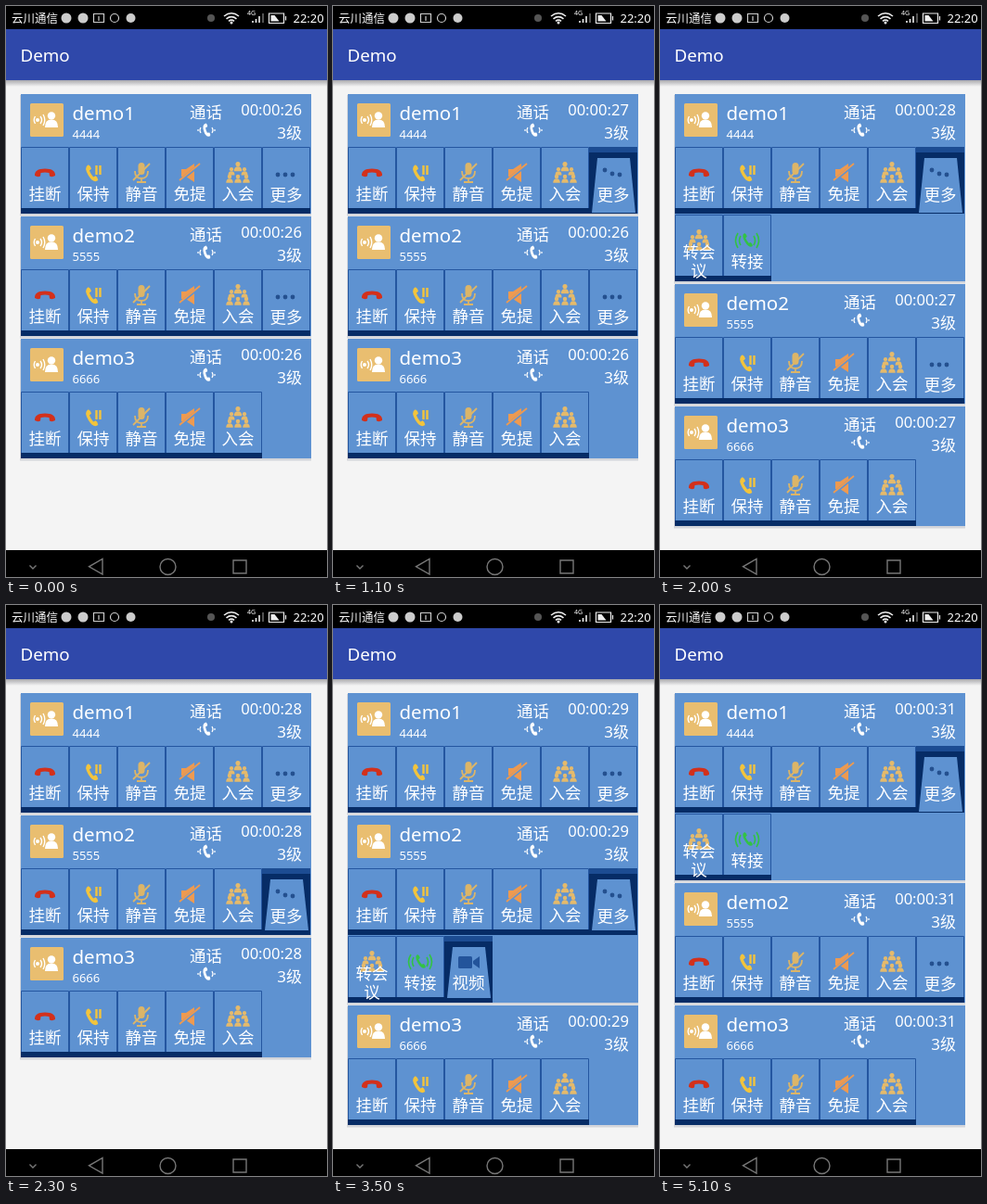
Animation, 346 px wide and 616 px high, one loop 5500 ms. Source, as an HTML page:

```html
<!DOCTYPE html>
<html lang="zh-CN">
<head>
<meta charset="utf-8">
<style>
  html, body { margin: 0; width: 100%; height: 100%; overflow: hidden; background: #f4f4f4; }
  svg { display: block; width: 346px; height: 616px; }
  text { font-family: "Noto Sans", "Noto Sans CJK SC", "Noto Sans CJK", sans-serif; fill: #fff; }
</style>
</head>
<body>
<svg id="stage" viewBox="0 0 346 616">
  <defs>
    <linearGradient id="shade" x2="0" y2="1">
      <stop stop-color="#a9a9ad"/><stop offset="1" stop-color="#f4f4f4"/>
    </linearGradient>
  </defs>
  <rect width="346" height="616" fill="#f4f4f4"/>
  <rect y="80" width="346" height="7" fill="url(#shade)"/>
  <rect y="25" width="346" height="55" fill="#2f48aa"/>
  <text x="15.500" y="60" font-size="18.800">Demo</text>

  <rect width="346" height="25"/>
  <text x="6" y="18" font-size="12.500">云川通信</text>
  <g fill="#ccc">
    <circle cx="65" cy="13" r="5.500"/><circle cx="83" cy="13" r="5.500"/><circle cx="134.500" cy="13" r="5"/>
  </g>
  <circle cx="221" cy="13" r="4" fill="#555"/>
  <g fill="none" stroke="#ccc" stroke-width="1.200">
    <path d="M94.500 8.500h11v9h-11zM100 11v5"/>
    <circle cx="117" cy="13" r="4.500"/>
  </g>
  <g fill="none" stroke="#eee" stroke-width="1.600">
    <path d="M235 11q8-6.500 16 0M237.500 13.800q5.500-4.500 11 0M240 16.300q3-2.500 6 0"/>
    <path d="M266 18v-2M269.500 18v-4M273 18v-7"/><path d="M277 18V8" stroke="#666"/>
    <path d="M283.500 8h16v10.500h-16zM301.500 11v4.500" stroke-width="1.200"/>
  </g>
  <circle cx="243" cy="18" r="1.500" fill="#eee"/>
  <path d="M285.500 10h4l5 6.500h-9z" fill="#eee"/>
  <text x="260" y="10" font-size="7">4G</text>
  <text x="309.500" y="18" font-size="13">22:20</text>

  <rect y="587" width="346" height="29"/>
  <g fill="none" stroke="#777" stroke-width="1.400">
    <path d="M25.500 603.500l3.500 3.500 3.500-3.500M104 596.500v16.500l-14.500-8.200zM245 598h14v14h-14z"/>
    <circle cx="174.500" cy="605" r="8.500"/>
  </g>
  <g id="cards"></g>
</svg>
<script>
const LOOP = 5500, BLUE = '#5e92d1', DARK = '#062c66', EDGE = '#2456a0', SAND = '#e5ba6b';

const at = (x, y, body, more = '') => `<g transform="translate(${x} ${y}) ${more}">${body}</g>`;
const box = (x, y, w, h, fill, more = '') =>
  `<rect x="${x}" y="${y}" width="${w}" height="${h}" fill="${fill}" ${more}/>`;
const path = (d, fill) => `<path d="${d}" fill="${fill}"/>`;
const line = (d, color, w = 1.5) => `<path d="${d}" fill="none" stroke="${color}" stroke-width="${w}"/>`;
const dot = (x, y, r, fill) => `<circle cx="${x}" cy="${y}" r="${r}" fill="${fill}"/>`;
const text = (x, y, size, s, anchor = 'start') =>
  `<text x="${x}" y="${y}" font-size="${size}" text-anchor="${anchor}">${s}</text>`;

const handset = color =>
  path('M-11 3Q-11.500-4.500 0-4.500T11 3Q8 5 5 3.500L4.500 0Q0-1-4.500 0L-5 3.500Q-8 5-11 3Z', color);
const person = (x, y, k, color) => at(x, y,
  dot(0, -4, 3, color) + path('M-5 5Q-5-1 0-1T5 5Z', color), `scale(${k})`);
const dots = tilted =>
  [-9, -1, 7].map((x, i) => dot(x, tilted ? [-3, 1, 2][i] : 2, 2.4, '#24508f')).join('');

const icons = {
  hangup: () => handset('#d3301b'),
  hold: () => at(-2, 1, handset('#f3c43c'), 'rotate(-122) scale(.9 .8)') +
    line('M3.500-8V2M7.500-8V2', '#f3c43c', 2.4),
  mute: () => box(-3.500, -11, 7, 13, '#dcb568', 'rx="3.500"') +
    line('M-7-2Q-7 6 0 6T7-2M0 6V10M-5 10H5M-9 8L9-10', '#dcb568', 1.8),
  speaker: () => path('M-9-4H-4L5-10V10L-4 4H-9Z', '#ee9a50') +
    line('M-11 9L11-9', BLUE, 3.5) + line('M-11 8L11-10', '#ee9a50', 1.8),
  group: () => person(0, -6, .85, SAND) + person(-7, -1, .7, SAND) + person(7, -1, .7, SAND) +
    [-9, 0, 9].map(x => person(x, 7, .75, SAND)).join(''),
  more: dots,
  transfer: () => at(0, 0, handset('#32c344'), 'rotate(-122) scale(.75 .6)') +
    line('M-10-8Q-15 0-10 8M-7-5Q-10 0-7 5M10-8Q15 0 10 8M7-5Q10 0 7 5', '#32c344', 1.6),
  video: () => box(-11, -6, 15, 13, '#23549b', 'rx="1.500"') + path('M5-1L12-6V7L5 2Z', '#23549b')
};

const mainRow = [['hangup', '挂断'], ['hold', '保持'], ['mute', '静音'],
  ['speaker', '免提'], ['group', '入会'], ['more', '更多']];
const extraRow = [['group', '转会议'], ['transfer', '转接'], ['video', '视频']];

// A pressed tile leans back, showing the dark base behind it.
function tile([icon, label], i, pressed, foot) {
  const low = icon === 'more' ? 1 : 0;
  const face = pressed
    ? box(0, 0, 52, 72, DARK) + box(0, 0, 52, 6, '#1c4c92') +
      path(`M9 12H44L50 ${foot}H3Z`, BLUE)
    : box(0, 0, 52, 66, BLUE) + line('M.5 66V.5H51.500V66', EDGE, 1) + box(0, 66, 52, 6, DARK);
  const name = label.length > 2
    ? text(26, 47, 17.5, label.slice(0, 2), 'middle') + text(26, 67, 17.5, label[2], 'middle')
    : text(26, 56.5 + low, 17.5, label, 'middle');
  return at(i * 52, 0, face + at(26, 28, icons[icon](pressed)) + name);
}

const avatar = box(10, 10, 36, 36, '#e9be70', 'rx="1.500"') +
  person(33, 29, 1.4, '#fff') + dot(18, 28, 2, '#fff') +
  line('M15.500 24Q13 28 15.500 32M21 24Q24 28 21 32M24 22Q27.500 28 24 34', '#fff', 1.4);
const ringing = at(200, 39, at(0, 0, handset('#fff'), 'rotate(-108) scale(.66)') +
  line('M-6-3Q-8 0-6 3M6-3Q8 0 6 3M-9-1V1M9-1V1', '#fff', 1.2));

const within = (t, spans) => spans.some(([a, b]) => t >= a && t < b);
const cards = [
  { name: 'demo1', number: '4444', row: mainRow, extra: extraRow.slice(0, 2), foot: 71,
    press: [[1100, 2200], [4000, LOOP]], open: [[1200, 2200], [4000, LOOP]],
    ticks: [1100, 2000, 3100, 4000, 5000] },
  { name: 'demo2', number: '5555', row: mainRow, extra: extraRow, foot: 67,
    press: [[2200, 3700]], open: [[2400, 3700]],
    ticks: [1200, 2100, 3200, 4100, 5000] },
  { name: 'demo3', number: '6666', row: mainRow.slice(0, 5), press: [], open: [],
    ticks: [1400, 2200, 3200, 4100, 5100] }
];

function card(c, y, t) {
  const open = within(t, c.open), pressed = within(t, c.press), h = open ? 202 : 129;
  const secs = 26 + c.ticks.filter(k => t >= k).length;
  const row = c.row.map((d, i) => tile(d, i, pressed && i === 5, c.foot)).join('');
  const extra = open ? c.extra.map((d, i) =>
    tile(d, i, d[0] === 'video' && within(t, [[3100, 3600]]), 67)).join('') : '';
  return at(16, y,
    box(-1, 1, 314, h + 1.5, '#d3d5da') + box(0, 0, 313, h, BLUE) +
    avatar + text(55.5, 27.5, 20.5, c.name) + text(55.5, 48, 13, c.number) +
    text(199.5, 26, 17.5, '通话', 'middle') + ringing +
    text(303, 23, 16.6, '00:00:' + secs, 'end') + text(303, 47.5, 17, '3级', 'end') +
    at(0, 57, row) + at(0, 130, extra));
}

const layer = document.getElementById('cards');
let start, last;
function frame(now) {
  start ??= now;
  const t = (now - start) % LOOP;
  let y = 95, out = '';
  for (const c of cards) {
    out += card(c, y, t);
    y += within(t, c.open) ? 205 : 132;
  }
  if (out !== last) layer.innerHTML = last = out;
  requestAnimationFrame(frame);
}
requestAnimationFrame(frame);
</script>
</body>
</html>
```
